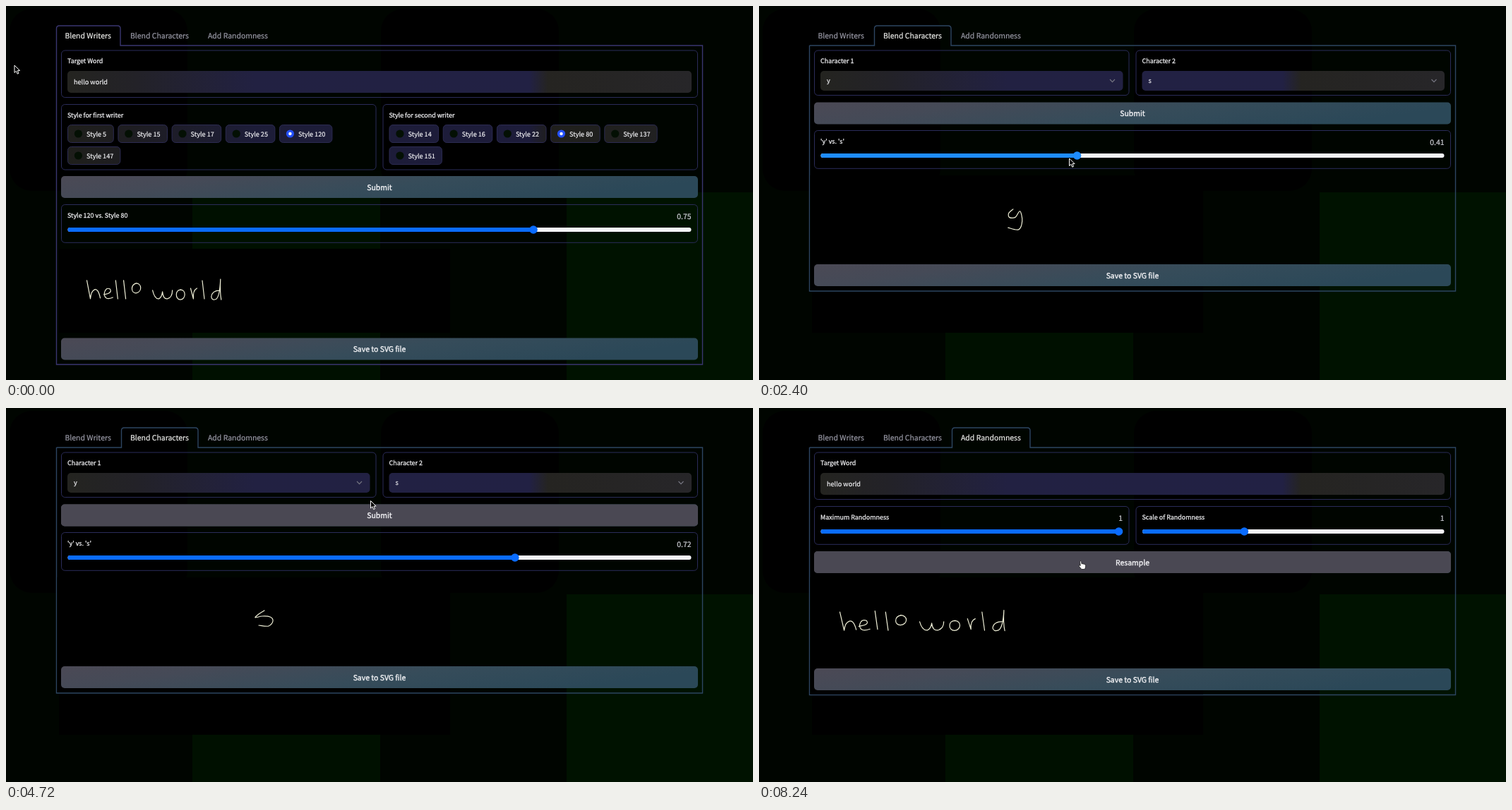
Animation of 1058x530 px, one loop 8.28 s. Source, as an HTML page:

```html
<!DOCTYPE html>
<html lang="en">
<head>
<meta charset="utf-8">
<title>Handwriting blender</title>
<style>
html, body { margin: 0; width: 100%; height: 100%; overflow: hidden; background: #000200; }
svg { display: block; width: 100vw; height: 100vh; }
text { font: 500 10.44px "Noto Sans CJK JP", "Noto Sans CJK SC", "Noto Sans CJK", "Open Sans", sans-serif; color: #f0f0f3; fill: currentColor; stroke: currentColor; stroke-width: .2px; text-rendering: geometricPrecision; }
.label { font-size: 8.95px; stroke-width: .28px; }
.field { font-size: 9.15px; }
.strong { stroke-width: .38px; }
.tab { color: #9898a5; }
.tab.on { color: #ececea; }
.mid { text-anchor: middle; }
.end { text-anchor: end; color: #d0d0d8; }
.block { stroke: #2b2c5a; }
.chip { fill-opacity: .85; stroke: #2c2b52; }
.frame { fill: none; stroke-width: 1.4; }
.ink { fill: none; stroke: #eeeed6; stroke-width: 1.2; stroke-linecap: round; stroke-linejoin: round; }
.ink path { vector-effect: non-scaling-stroke; }
</style>
</head>
<body>
<svg id="stage" viewBox="0 0 1058 530" preserveAspectRatio="none" xmlns="http://www.w3.org/2000/svg"></svg>
<script>
const LOOP = 8280;
const OPEN_CHARACTERS = 720, OPEN_RANDOM = 5240;
const FIRST_RESAMPLE = 6200, RESAMPLE_EVERY = 400, RESAMPLES = 5;
const LEFT = [78, 524.5], RIGHT = [533.5, 980], FULL = [78, 980];

const rect = (x, y, r, b, fill, extra = '') =>
  `<rect x="${x}" y="${y}" width="${r - x}" height="${b - y}" fill="${fill}" ${extra}/>`;
const text = (x, y, s, cls, id = '') => `<text x="${x}" y="${y}" class="${cls}" id="${id}">${s}</text>`;
const block = ([x, r], y, b) => rect(x + .5, y + .5, r - .5, b - .5, 'none', 'rx="5" class="block"');
const label = ([x], y, s) => text(x + 9, y, s, 'label');
const knobX = ([x, r], fraction) => x + 15 + (r - x - 30) * fraction;

function button(y, s, hoverId) {
  return rect(78, y, 980, y + 31, 'url(#button)', 'rx="5"') +
    (hoverId ? rect(78, y, 980, y + 31, '#4a4853', `rx="5" id="${hoverId}"`) : '') +
    text(529, y + 19.6, s, 'strong mid');
}

function inputBlock(span, height, title, value) {
  const [x, r] = span;
  return block(span, 62.5, 99 + height) + label(span, 81.4, title) +
    rect(x + 9, 92, r - 9, 92 + height, 'url(#field)', 'rx="5"') + text(x + 18, 95.2 + height / 2, value, 'field');
}

function selectBlock(span, title, value) {
  const x = span[1] - 24;
  return inputBlock(span, 28, title, value) +
    `<path d="M${x - 3.5} 104l3.5 3.6 3.5-3.6" fill="none" stroke="#777783" stroke-width="1.1"/>`;
}

function sliderBlock(span, y, title, value, fraction, id) {
  const x = span[0] + 9.5, r = span[1] - 9.5, knob = knobX(span, fraction);
  return block(span, y, y + 54.8) + label(span, y + 19.2, title) + text(r, y + 21.2, value, 'end', id + 'Value') +
    rect(x, y + 33, r, y + 39, '#f4f4f8', 'rx="3"') +
    rect(x, y + 33, knob, y + 39, '#0a6cff', `rx="3" id="${id}Fill"`) +
    `<circle cx="${knob}" cy="${y + 36}" r="5.8" fill="#0a6cff" id="${id}Knob"/>`;
}

function styleBlock(span, title, styles, chosen) {
  let x = span[0] + 9, y = 168;
  return block(span, 139, 232.5) + label(span, 158.4, title) + styles.map((style, i) => {
    if (i === 5) { x = span[0] + 9; y = 199; }
    const width = 61 + 4.8 * String(style).length;
    const on = style === chosen;
    const chip = rect(x + .5, y + .5, x + width - .5, y + 25.5, 'url(#field)', 'rx="5" class="chip"') +
      `<circle cx="${x + 15.4}" cy="${y + 13}" r="5.6" fill="${on ? '#2450f8' : '#041004'}"/>` +
      (on ? `<circle cx="${x + 15.4}" cy="${y + 13}" r="2.2" fill="#fff"/>` : '') +
      text(x + 27, y + 16.5, 'Style ' + style, 'field');
    x += width + 5.6;
    return chip;
  }).join('');
}

const frame = (from, to, bottom, color) =>
  `<path class="frame" stroke="${color}" d="M71.5 56H${from}V32q0-4 4-4H${to - 4}q4 0 4 4V56H986.5V${bottom}H71.5V56"/>`;

// Letter: pen advance, then strokes from the left edge on the baseline. O is the raised o.
const LETTERS = {
  h: [24, 'M0-26L5 0Q6-11 11-13T19-1'],
  e: [17, 'M0-6Q13-8 9-14Q3-17 1-8Q1 3 13-2'],
  l: [11.5, 'M0-26L3 0'],
  o: [20, 'M7-13C-2-14-2 1 6 1C14 0 14-13 6-13'],
  O: [15, 'M6-22C-3-20-2-8 5-8C14-9 14-22 5-22'],
  ' ': [14, ''],
  w: [34, 'M0-12Q3 1 9 0Q13-2 14-10Q15 1 21 0Q28-2 28-12'],
  r: [16.5, 'M0-15L4 0Q3-12 9-15'],
  d: [16, 'M13-12Q2-12 1-3Q2 3 8 0Q13-4 14-28Q13-10 15 1']
};

function noise(n) {
  const v = Math.sin(n * 127.1) * 43758.5453;
  return v - Math.floor(v) - .5;
}

function write(baseline, stretch, jitter, seed) {
  let pen = 114.5;
  return [...'hellO world'].map((letter, i) => {
    const [advance, strokes] = LETTERS[letter];
    const x = pen + (i ? jitter * noise(seed * 20 + i) : 0);
    const y = baseline + jitter * noise(seed * 50 + i) / 2;
    pen += advance * stretch;
    return `<path transform="translate(${x} ${y}) scale(${stretch} 1)" d="${strokes}"/>`;
  }).join('');
}

const targetWord = inputBlock(FULL, 31, 'Target Word', 'hello world');
const pages = [
  frame(71.5, 162, 508, '#3a3670') + targetWord +
  styleBlock(LEFT, 'Style for first writer', [5, 15, 17, 25, 120, 147], 120) +
  styleBlock(RIGHT, 'Style for second writer', [14, 16, 22, 80, 137, 151], 80) +
  button(241, 'Submit') + sliderBlock(FULL, 281, 'Style 120 vs. Style 80', '0.75', .75, 'style') +
  `<g class="ink">${write(415, 1, 1, 1)}</g>` + button(470.5, 'Save to SVG file'),

  frame(163.5, 272, 404, '#2d4562') + rect(72.5, 240, 629, 403, '#000') +
  selectBlock(LEFT, 'Character 1', 'y') + selectBlock(RIGHT, 'Character 2', 's') +
  button(136.5, 'Submit', 'submitHover') + sliderBlock(FULL, 176, "'y' vs. 's'", '', .66, 'mix') +
  '<g class="ink"><path id="glyph"/></g>' + button(366, 'Save to SVG file'),

  frame(273.5, 384, 406.5, '#2d4562') + rect(72.5, 240, 629, 406, '#000') + targetWord +
  sliderBlock(LEFT, 139, 'Maximum Randomness', '1', 1, 'max') +
  sliderBlock(RIGHT, 139, 'Scale of Randomness', '1', 1 / 3, 'scale') +
  button(203, 'Resample', 'resampleHover') + '<g class="ink" id="sample"></g>' + button(369, 'Save to SVG file')
];

const gradient = (id, attrs, stops) => `<linearGradient id="${id}" ${attrs}>` +
  stops.map(([at, color]) => `<stop offset="${at}" stop-color="${color}"/>`).join('') + '</linearGradient>';

document.getElementById('stage').innerHTML =
  '<defs>' +
  gradient('button', 'x2="1" y2=".25"', [[0, '#4b4955'], [.25, '#454a57'], [.6, '#364c5a'], [1, '#2b4858']]) +
  gradient('field', 'gradientUnits="userSpaceOnUse" x1="87" x2="971"',
    [[0, '#242420'], [.11, '#232228'], [.3, '#222142'], [.74, '#222144'], [.77, '#252421'], [1, '#272629']]) +
  '</defs>' +
  rect(0, 0, 1058, 530, '#000500') + rect(264, 264, 530, 530, '#001000') + rect(794, 264, 1058, 530, '#001200') +
  [5, 531].map(x => rect(x, 4, x + 252, 262, '#000', 'rx="32"')).join('') +
  rect(75, 344, 629, 463, '#000') +
  pages.map(page => `<g class="page">${page}</g>`).join('') +
  text(83.5, 46, 'Blend Writers', 'tab') + text(176, 46, 'Blend Characters', 'tab') + text(286, 46, 'Add Randomness', 'tab') +
  '<g id="cursor" stroke="#fff" stroke-linejoin="round">' +
  '<path id="arrow" fill="#000" d="M0 0V10.5L2.5 8.2 4.2 12.2 6 11.4 4.4 7.6H7.6Z"/>' +
  '<path id="hand" fill="#fff" stroke="#111" stroke-width=".7" d="M0 .5Q1.2-.8 2 .8L2.6 4Q4 3 4.6 4.2 6 3.5 6.6 4.8 8.2 4.5 8.2 6.2L7.8 9.2 6.8 11.5H2.4L-1 7.5Q-2 5.6-.3 5.8L.8 6.6Z"/></g>';

const $ = id => document.getElementById(id);
const set = (id, attrs) => Object.entries(attrs).forEach(([name, value]) => $(id).setAttribute(name, value));
const show = (id, on) => $(id).style.display = on ? '' : 'none';
const pageEls = document.querySelectorAll('.page'), tabEls = document.querySelectorAll('.tab');

const clamp = u => Math.max(0, Math.min(1, u));
const smooth = u => clamp(u) ** 2 * (3 - 2 * clamp(u));
const mix = (a, b, u) => a.map((v, k) => v + (b[k] - v) * u);

// The knob is dragged down and back up along a parabola between its two rests.
const DRAG_START = 1770, DRAG_TURN = 2925, DRAG_END = 4183;
function dragValue(t) {
  const s = (Math.max(DRAG_START, Math.min(DRAG_END, t)) - DRAG_TURN) / 1000;
  return .34 + .24 * s * s;
}

const MOVES = [
  { leave: 120, arrive: 600, to: [216, 41] },
  { leave: 760, arrive: 1080, to: [590, 181] },
  { leave: 1080, arrive: 1400, to: [668, 215] },
  { leave: 4340, arrive: 4720, to: [516.5, 131.5] },
  { leave: 4720, arrive: 5120, to: [330, 42] },
  { leave: 5280, arrive: 5640, to: [437.5, 188.5] },
  { leave: 5640, arrive: 5920, to: [454.5, 217] }
];

function pointerAt(t) {
  let at = [12, 84];
  for (const { leave, arrive, to } of MOVES) {
    if (t < leave) break;
    // The hand runs slightly ahead of the knob.
    if (leave > DRAG_END && at[1] === 215) at = [knobX(FULL, dragValue(DRAG_END)), 215];
    at = mix(at, to, smooth((t - leave) / (arrive - leave)));
  }
  return t > DRAG_START && t < MOVES[3].leave ? [knobX(FULL, dragValue(t + 35)), 216] : at;
}

const Y_SHAPE = [359,288, 353,294, 355,300, 363,300, 369,290, 372,305, 367,318, 352,315];
const S_SHAPE = [366,287, 358,292, 353,297, 363,295, 374,296, 378,302, 372,309, 358,308];

function curve(flat) {
  const last = flat.length / 2 - 1;
  const p = i => { const k = Math.max(0, Math.min(last, i)) * 2; return flat.slice(k, k + 2); };
  let d = 'M' + p(0);
  for (let i = 0; i < last; i++) {
    const [a, b, c, e] = [p(i - 1), p(i), p(i + 1), p(i + 2)];
    d += `C${b.map((v, k) => v + (c[k] - a[k]) / 6)} ${c.map((v, k) => v - (e[k] - b[k]) / 6)} ${c}`;
  }
  return d;
}

let shownSample = -1;

function draw(t) {
  const page = t < OPEN_CHARACTERS ? 0 : t < OPEN_RANDOM ? 1 : 2;
  pageEls.forEach((el, i) => el.style.display = i === page ? '' : 'none');
  tabEls.forEach((el, i) => el.classList.toggle('on', i === page));

  const [x, y] = pointerAt(t);
  const overTab = y > 29 && y < 55 && x > 72 && x < 384;
  const overSubmit = page === 1 && y > 136 && y < 167;
  const overResample = page === 2 && y > 203 && y < 234;
  const pointing = overTab || overSubmit || overResample;
  set('cursor', { transform: `translate(${x} ${y})` });
  show('arrow', !pointing);
  show('hand', pointing);
  show('submitHover', page === 1 && y > 128 && y < 167);
  show('resampleHover', overResample);

  const value = Math.round(dragValue(t) * 100) / 100;
  const knob = knobX(FULL, value);
  const fill = page === 1 && y > 206 ? '#1e8cff' : '#0a6cff';
  $('mixValue').textContent = String(value);
  set('mixFill', { width: knob - 87.5, fill });
  set('mixKnob', { cx: knob, fill });
  set('glyph', { d: curve(mix(Y_SHAPE, S_SHAPE, smooth((value - .33) / .36))) });
  set('maxFill', { fill: overResample ? '#0a6cff' : '#0c4aa6' });

  const sample = Math.max(0, Math.min(RESAMPLES, Math.ceil((t - FIRST_RESAMPLE) / RESAMPLE_EVERY)));
  if (sample !== shownSample) {
    $('sample').innerHTML = write(314.5, 1.22, 5, sample + 3);
    shownSample = sample;
  }
}

const start = performance.now();
function tick() {
  draw((performance.now() - start) % LOOP);
  requestAnimationFrame(tick);
}
tick();
</script>
</body>
</html>
```
